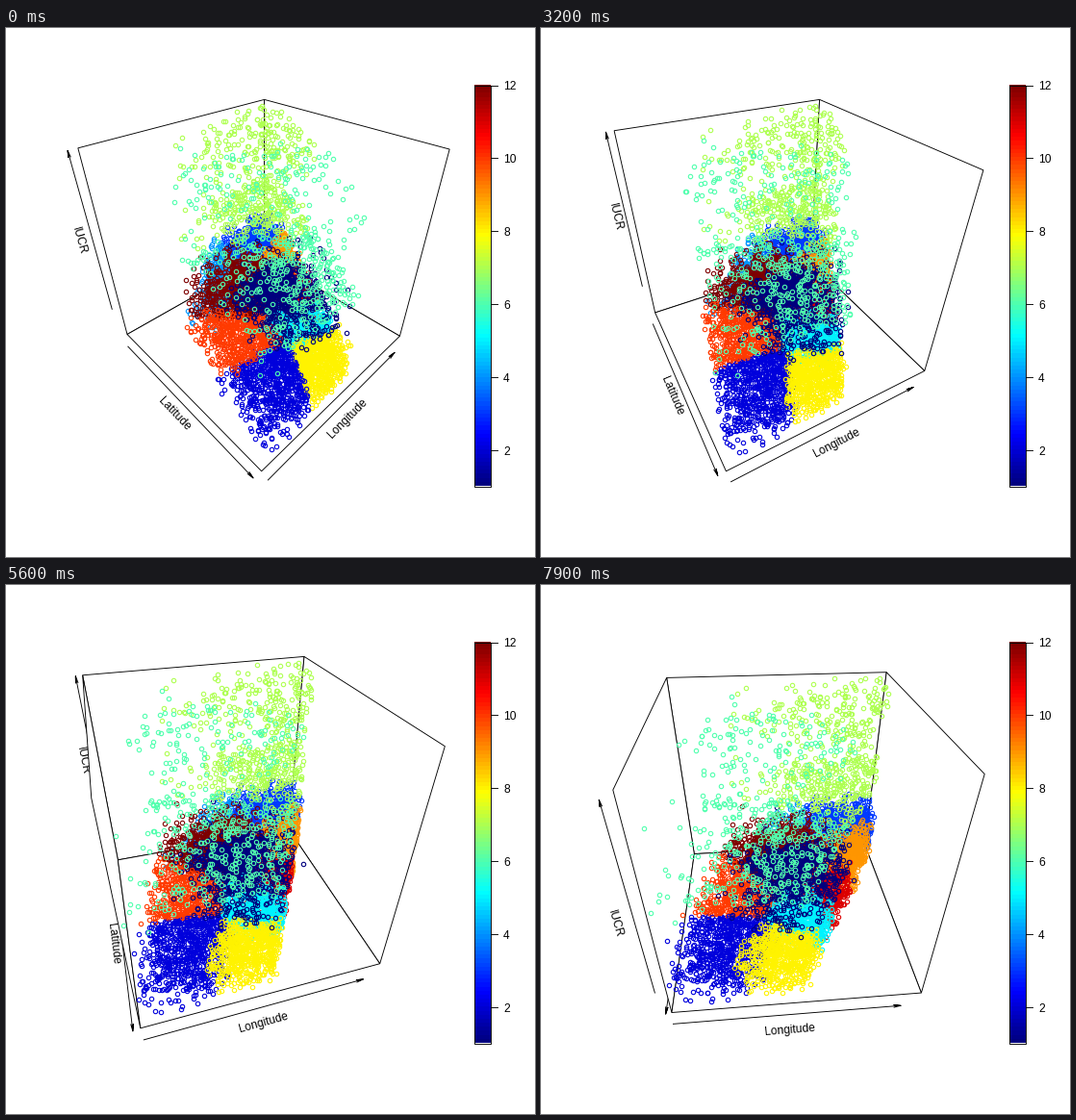
These frames come from a looping animation (550 px wide and 550 px high, 8000 ms). A matplotlib script:

```python
import numpy as np
import matplotlib.pyplot as plt
from matplotlib.animation import FuncAnimation
from matplotlib.colors import LinearSegmentedColormap

SIZE, DPI = 550, 100
FRAMES, INTERVAL = 80, 100
PX = 72 / DPI
PHI = np.radians(35)
EYE = np.sqrt(3) + 2
SPAN, MID = 386.4, (268, 267.6)
FONT = dict(family="Liberation Sans", size=12 * PX)
LINE = dict(color="black", lw=0.9 * PX)

jet = LinearSegmentedColormap.from_list("jet9", [
    "#00007F", "#0000FF", "#007FFF", "#00FFFF", "#7FFF7F",
    "#FFFF00", "#FF7F00", "#FF0000", "#7F0000"], N=1024)
rng = np.random.default_rng(12)


def city(x):
    """Random y for each x, between the shore and a thinning western edge."""
    shore = np.minimum(0.6 - 0.55 * x, 0.98)
    west = np.maximum(-0.75 - 0.25 * x, -1.35 - 1.5 * x)
    return shore - (shore - west) * rng.beta(1, 1.5, len(x))


def layer(x, z):
    return np.column_stack([x, city(x), np.clip(z, -1, 1)])


def make_points():
    common = layer(rng.uniform(-1, 1, 6300), rng.triangular(-1, -0.65, -0.25, 6300))
    inner = rng.normal((0, 0, -0.32), (0.24, 0.2, 0.04), (900, 3))
    band = layer(rng.uniform(-1, 1, 680), rng.normal(0.1, 0.06, 680))
    upper = layer(np.clip(rng.normal(-0.35, 0.4, 270), -1, 1), rng.normal(0.82, 0.1, 270))
    loose = layer(rng.uniform(-1, 1, 130), rng.uniform(0.1, 1, 130))
    return np.vstack([common, inner, band, upper, loose])


# one centre per colour value; each point takes the nearest
CENTERS = np.array([
    (.27, .02, -.36), (.55, -.48, -.68), (-.82, .60, -.60), (-.78, -.02, -.62),
    (.42, .10, -.62), (.30, -.20, .40), (-.55, .40, .40), (.82, -.05, -.65),
    (-.32, .66, -.62), (.20, -.45, -.60), (.22, .42, -.65), (-.25, -.05, -.50)])
points = make_points()
gaps = (points[:, None] - CENTERS) * (1, 1, 2)
colors = jet(np.argmin((gaps ** 2).sum(axis=2), axis=1) / 11)

CORNERS = np.array([(x, y, z) for x in (-1, 1) for y in (-1, 1) for z in (-1, 1)])


class View:
    """Perspective camera whose box is fitted to the plot area."""

    def __init__(self, theta):
        self.c, self.s = np.cos(theta), np.sin(theta)
        self.eye = EYE * np.array([self.s * np.cos(PHI), -self.c * np.cos(PHI), np.sin(PHI)])
        uv, _ = self.flat(CORNERS)
        low, high = uv.min(axis=0), uv.max(axis=0)
        self.scale = SPAN / (high - low).max()
        self.center = (low + high) / 2

    def flat(self, p):
        x, y, z = np.asarray(p, float).T
        right = x * self.c + y * self.s
        away = y * self.c - x * self.s
        depth = EYE - z * np.sin(PHI) + away * np.cos(PHI)
        up = z * np.cos(PHI) + away * np.sin(PHI)
        return np.column_stack([right / depth, up / depth]), depth

    def pixels(self, p):
        uv, depth = self.flat(p)
        return MID + (uv - self.center) * self.scale * (1, -1), depth


fig = plt.figure(figsize=(SIZE / DPI, SIZE / DPI), dpi=DPI, facecolor="white")
ax = fig.add_axes([0, 0, 1, 1])

# colour key
TOP, BOTTOM, LEFT, RIGHT = 59.5, 476.5, 486.5, 503.5
ax.imshow(jet(np.linspace(1, 0, 100))[:, None], extent=(LEFT, RIGHT, BOTTOM, TOP),
          interpolation="nearest", aspect="auto")
ax.plot([LEFT, RIGHT, RIGHT, LEFT, LEFT], [TOP, TOP, BOTTOM, BOTTOM, TOP], **LINE)
for tick in range(2, 13, 2):
    y = BOTTOM - (tick - 1) / 11 * (BOTTOM - TOP)
    ax.plot([RIGHT, RIGHT + 7], [y, y], **LINE)
    ax.text(517, y + 0.5, str(tick), va="center_baseline", **FONT)

ax.set_xlim(0, SIZE)
ax.set_ylim(SIZE, 0)
ax.axis("off")

# box faces: axis, side, corners, patch
SQUARE = np.array([(-1, -1), (-1, 1), (1, 1), (1, -1)])
faces = []
for axis in range(3):
    for side in (-1, 1):
        patch = plt.Polygon(np.zeros((4, 2)), fc="white", ec="black",
                            lw=LINE["lw"], zorder=4)
        faces.append((axis, side, np.insert(SQUARE, axis, side, axis=1),
                      ax.add_patch(patch)))

# name, first and last position along its own axis
AXES = [("Latitude", -.90, .97), ("Longitude", -.99, .82), ("IUCR", -.65, .98)]
arrows = [ax.plot([], [], zorder=2, **LINE)[0] for _ in AXES]
labels = [ax.text(0, 0, name, ha="center", va="center_baseline",
                  rotation_mode="anchor", zorder=3, **FONT) for name, *_ in AXES]

dots = ax.scatter(*np.zeros((2, len(points))), s=(4.4 * PX) ** 2,
                  facecolors="none", edgecolors=colors, linewidths=1.1 * PX, zorder=5)


def arrow_path(a, b, length=7.2, spread=np.radians(10)):
    back = np.arctan2(*(a - b)[::-1])
    wings = [b + length * np.array([np.cos(back + k), np.sin(back + k)])
             for k in (spread, -spread)]
    return np.array([a, b, wings[0], b, wings[1]])


def place_axis(view, axis):
    _, lo, hi = AXES[axis]
    # the upright axis stands on the leftmost foot
    feet, _ = view.pixels([(-1, -1, -1), (1, -1, -1)])
    foot = -1 if feet[0, 0] <= feet[1, 0] else 1
    edge = np.array([(0, -1, -1), (1, 0, -1), (foot, -1, 0)][axis])
    ends = np.outer([1.06, 1.06, 1.135], edge)
    ends[:, axis] = lo, hi, (lo + hi) / 2
    (a, b, mid), _ = view.pixels(ends)
    arrows[axis].set_data(*arrow_path(a, b).T)
    dx, dy = b - a if a[0] < b[0] else a - b
    labels[axis].set_position(mid)
    labels[axis].set_rotation(np.degrees(np.arctan2(-dy, dx)))


def draw(k):
    view = View(np.radians(45.5 + 0.5 * k))
    for axis, side, quad, patch in faces:
        patch.set_visible(side * view.eye[axis] < 1)
        patch.set_xy(view.pixels(quad)[0])
    for axis in range(3):
        place_axis(view, axis)
    xy, depth = view.pixels(points)
    order = np.argsort(-depth)
    dots.set_offsets(np.floor(xy[order]) + 0.5)
    dots.set_edgecolors(colors[order])
    return [dots]


anim = FuncAnimation(fig, draw, frames=FRAMES, interval=INTERVAL, repeat=True, blit=False)
plt.show()
```
